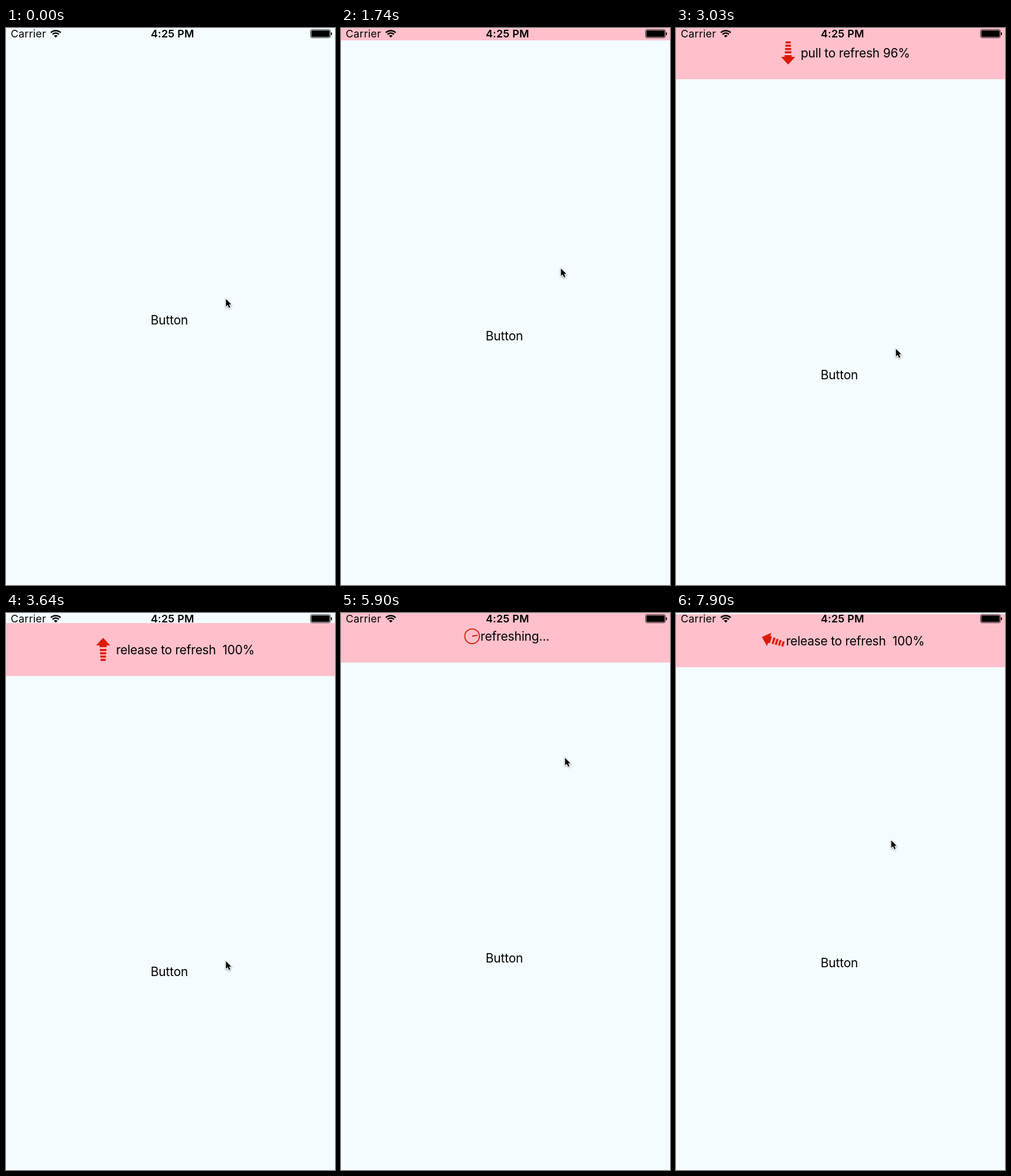
An HTML page with a canvas for the animation above (7990 ms loop, 559x945 px).

```html
<!DOCTYPE html>
<html lang="en">
<head>
<meta charset="utf-8">
<title>Pull to refresh</title>
<style>
  html, body { margin: 0; width: 100%; height: 100%; overflow: hidden; background: #f4fcff; }
  canvas { display: block; width: 559px; height: 945px; }
</style>
</head>
<body>
<canvas></canvas>
<script>
const W = 559, H = 945, LOOP = 7990, LAST_CHANGE = 7900;
const HEADER = 90, THRESHOLD = 96, RED = '#dc1a08';
const ARMED = 3090, RELEASED = 3940, REFRESHED = 6290, RETURN = 6390;
const SECOND_PULL = 7210, SECOND_ARMED = 7780;

const canvas = document.querySelector('canvas');
const ctx = canvas.getContext('2d');
const dpr = window.devicePixelRatio || 1;
canvas.width = W * dpr;
canvas.height = H * dpr;

const ramp = (t, start, end) => Math.min(1, Math.max(0, (t - start) / (end - start)));
const linear = p => p;
const sineOut = p => Math.sin(p * Math.PI / 2);
const cubicOut = p => 1 - (1 - p) ** 3;

// The pointer rests between these moves
const moves = [
  { start: 120, end: 470, x: 373, y: 343, ease: linear },
  { start: 640, end: 1160, x: 373, y: 361, ease: linear },
  { start: 1160, end: 2360, x: 373, y: 454.5, ease: linear },
  { start: 2360, end: 3900, x: 373, y: 594, ease: sineOut },
  { start: 4000, end: 4740, x: 398, y: 348, ease: linear },
  { start: 4740, end: 5500, x: 380, y: 244, ease: sineOut },
  { start: 6360, end: 7100, x: 369, y: 193, ease: linear },
  { start: 7100, end: SECOND_PULL, x: 368, y: 178, ease: linear },
  { start: SECOND_PULL, end: LAST_CHANGE, x: 365, y: 384, ease: sineOut }
];

function pointerAt(t) {
  let x = 373, y = 458;
  for (const move of moves) {
    const p = move.ease(ramp(t, move.start, move.end));
    x += (move.x - x) * p;
    y += (move.y - y) * p;
  }
  return { x, y };
}

// Scroll view resistance to a drag of the given length
function rubberBand(distance) {
  const u = Math.max(0, distance) * 0.55 / H;
  return H * u / (1 + u);
}

function offsetAt(t) {
  const { y } = pointerAt(t);
  if (t < 640) return 0;
  if (t < RELEASED) return rubberBand(y - 355);
  if (t < SECOND_PULL) {
    const settle = cubicOut(ramp(t, RELEASED, RELEASED + 350));
    const close = cubicOut(ramp(t, RETURN, RETURN + 380));
    return (HEADER + 25.5 * (1 - settle)) * (1 - close);
  }
  return rubberBand(y - 186);
}

function arrowTurn(t) {
  const flip = start => ramp(t, start, start + 200);
  return Math.PI * (flip(ARMED) - flip(REFRESHED) + flip(SECOND_ARMED));
}

function text(string, x, y, spacing = -0.12, size = 20.9, weight = 400) {
  ctx.font = `${weight} ${size}px Inter, Roboto, sans-serif`;
  ctx.letterSpacing = spacing + 'px';
  ctx.fillStyle = '#000';
  ctx.fillText(string, x, y);
}

function polygon(points) {
  ctx.beginPath();
  points.forEach(([x, y]) => ctx.lineTo(x, y));
  ctx.closePath();
}

function drawArrow(x, y, angle) {
  ctx.save();
  ctx.translate(x, y);
  ctx.rotate(angle);
  ctx.fillStyle = RED;
  polygon([[0, 20], [-12, 7], [-6, 7], [-6, 4], [6, 4], [6, 7], [12, 7]]);
  ctx.fill();
  for (let i = 0; i < 4; i++) {
    const half = 5.6 - i * 0.4;
    ctx.fillRect(-half, -2.5 - i * 5.6, half * 2, 3.5);
  }
  ctx.restore();
}

function drawSpinner(x, y, t) {
  const angle = -0.21 + (t - 5900) / 1000 * Math.PI * 2;
  ctx.strokeStyle = RED;
  ctx.lineWidth = 1.8;
  ctx.beginPath();
  ctx.arc(x, y, 12.4, 0, Math.PI * 2);
  ctx.moveTo(x, y);
  ctx.lineTo(x + 9.5 * Math.cos(angle), y + 9.5 * Math.sin(angle));
  ctx.stroke();
}

function drawHeader(t, offset) {
  const top = offset - 6 - HEADER;
  if (top <= -HEADER) return;
  ctx.fillStyle = '#ffc0cb';
  ctx.fillRect(0, top, W, HEADER);
  const middle = top + 45, baseline = top + 52.5;
  const armed = t >= SECOND_ARMED || (t >= ARMED && t < RELEASED);
  if (t >= RELEASED && t < REFRESHED) {
    drawSpinner(222.8, middle + 0.5, t);
    text('refreshing...', 237, baseline);
  } else if (armed) {
    drawArrow(165, middle, arrowTurn(t));
    text('release to refresh\u00a0 100%', 187, baseline, -0.22);
  } else {
    const percent = Math.min(99, Math.floor(offset / THRESHOLD * 100));
    drawArrow(190.5, middle, arrowTurn(t));
    text(`pull to refresh ${percent}%`, 212, baseline, -0.18);
  }
}

function drawStatusBar() {
  text('Carrier', 8, 16.4, 0.25, 17.9);
  text('4:25 PM', 246, 16.4, 0.2, 17.9, 600);

  const from = -Math.PI * 0.75, to = -Math.PI * 0.25;
  ctx.strokeStyle = '#000';
  ctx.lineWidth = 2.5;
  for (const radius of [11.9, 7.7]) {
    ctx.beginPath();
    ctx.arc(84.5, 16.3, radius, from, to);
    ctx.stroke();
  }
  ctx.beginPath();
  ctx.moveTo(84.5, 16.3);
  ctx.arc(84.5, 16.3, 4.4, from, to);
  ctx.fill();

  ctx.lineWidth = 0.8;
  ctx.beginPath();
  ctx.roundRect(517.5, 2.6, 33.5, 14, 2.5);
  ctx.stroke();
  ctx.beginPath();
  ctx.roundRect(518.8, 3.9, 31, 11.4, 1.5);
  ctx.roundRect(552, 7.2, 1.7, 5, 0.8);
  ctx.fill();
}

function drawPointer({ x, y }) {
  ctx.save();
  ctx.translate(x + 0.7, y + 1.7);
  polygon([[0, 0], [0, 12.8], [3, 10], [5.2, 15], [7.5, 14], [5.3, 9.2], [9.2, 9.2]]);
  ctx.shadowColor = 'rgba(0,0,0,.4)';
  ctx.shadowBlur = 2.5 * dpr;
  ctx.shadowOffsetY = dpr;
  ctx.strokeStyle = '#fff';
  ctx.lineWidth = 2;
  ctx.stroke();
  ctx.shadowColor = 'transparent';
  ctx.fillStyle = '#000';
  ctx.fill();
  ctx.restore();
}

function draw(now) {
  const t = Math.min(now % LOOP, LAST_CHANGE);
  const offset = Math.round(offsetAt(t));
  ctx.setTransform(dpr, 0, 0, dpr, 0, 0);
  ctx.fillStyle = '#f4fcff';
  ctx.fillRect(0, 0, W, H);
  drawHeader(t, offset);
  text('Button', 245.7, 502.6 + offset);
  drawStatusBar();
  drawPointer(pointerAt(t));
}

const start = performance.now();
function tick() {
  draw(performance.now() - start);
  requestAnimationFrame(tick);
}
tick();
</script>
</body>
</html>
```
